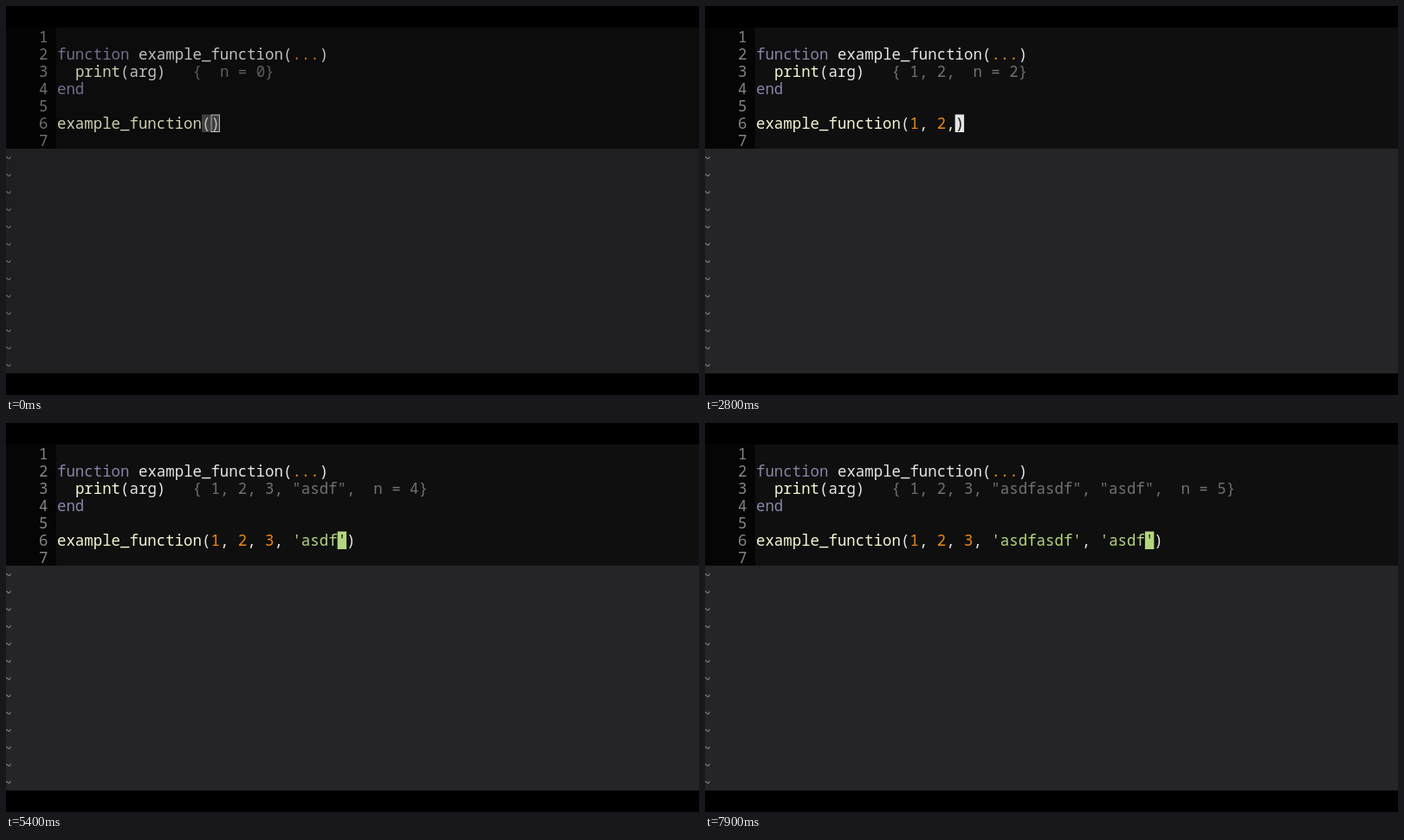
An HTML page for the animation above (8000 ms loop, 800 by 450 pixels).

```html
<!DOCTYPE html>
<html>
<head>
<meta charset="utf-8">
<style>
  html, body { margin: 0; width: 100%; height: 100%; overflow: hidden; background: #000; }
  svg { display: block; width: 800px; height: 450px; }
  text { font: 17.4px "Noto Sans Mono", "DejaVu Sans Mono", monospace; white-space: pre; }
</style>
</head>
<body>
<svg viewBox="0 0 800 450">
  <rect width="800" height="450" fill="#000"/>
  <rect y="25" width="800" height="140" fill="#0f0f10"/>
  <rect y="25" width="58" height="140" fill="#050506"/>
  <rect y="165" width="800" height="260" fill="#252427"/>
  <g id="still"></g>
  <g id="live"></g>
  <rect id="shade" width="800" height="450" fill="#000"/>
</svg>
<script>
const LOOP = 8000, CELL = 10.44, LEFT = 59, ROW = 20;
const color = {
  keyword: '#8585a6', plain: '#e6e6e6', call: '#f6f6d2', number: '#ee8a12',
  string: '#b4d67e', hint: '#717171', gutter: '#858585', tilde: '#858585',
  dark: '#161616', block: '#e4e4e2', match: '#4a4a4a'
};

const KEYS = "1, 2, 3, 'asdfasdf', 'asdf";
const TIMES = [1100, 1300, 1800, 2300, 2800, 2900, 3400, 3700, 3900, 4200,
  4800, 5000, 5100, 5300, 5600, 5700, 5900, 6000, 6400, 6900, 7000, 7200,
  7500, 7600, 7700, 7800];
const ARGS_COL = 17;

const byId = id => document.getElementById(id);
const escapeText = s => s.replace(/&/g, '&amp;').replace(/</g, '&lt;');
const colX = col => LEFT + col * CELL;

function word(row, col, content, fill) {
  return `<text x="${colX(col).toFixed(2)}" y="${22 + row * ROW}" fill="${fill}">${escapeText(content)}</text>`;
}

function cell(col, fill, stroke = 'none') {
  const inset = stroke === 'none' ? 0 : 0.5;
  return `<rect x="${colX(col) + inset}" y="${125.5 + inset}" width="${CELL - 2 * inset}" ` +
    `height="${20.5 - 2 * inset}" fill="${fill}" stroke="${stroke}"/>`;
}

function drawStill() {
  let out = '';
  for (let n = 1; n <= 7; n++) out += word(n, -2, String(n), color.gutter);
  for (let n = 8; n <= 20; n++) out += word(n, -6, '~', color.tilde);
  out += word(2, 0, 'function', color.keyword)
    + word(2, 9, 'example_function(', color.plain)
    + word(2, 26, '...', color.number)
    + word(2, 29, ')', color.plain)
    + word(3, 2, 'print', color.call)
    + word(3, 7, '(arg)', color.plain)
    + word(4, 0, 'end', color.keyword)
    + word(6, 0, 'example_function', color.call);
  byId('still').innerHTML = out;
}

function drawLive(typed, focused, matched) {
  const inString = typed.split("'").length % 2 === 0;
  const args = typed + (inString ? "'" : '');
  const cursor = ARGS_COL + typed.length;
  const values = args.match(/\d+|'[^']*'/g) || [];
  const hint = '{ ' + values.map(v => v.replace(/'/g, '"') + ', ').join('') + ` n = ${values.length}}`;

  let out = word(3, 15, hint, color.hint);
  if (matched) out += cell(ARGS_COL - 1, color.match);
  out += word(6, ARGS_COL - 1, '(', color.plain);
  for (const token of args.matchAll(/\d+|'[^']*'|,/g)) {
    const fill = token[0] === ',' ? color.plain : token[0][0] === "'" ? color.string : color.number;
    out += word(6, ARGS_COL + token.index, token[0], fill);
  }
  out += word(6, ARGS_COL + args.length, ')', color.plain);

  // The cursor covers the glyph beneath it with an inverted cell.
  const under = inString ? "'" : ')';
  out += focused
    ? cell(cursor, inString ? color.string : color.block) + word(6, cursor, under, color.dark)
    : cell(cursor, color.match, color.block) + word(6, cursor, under, color.plain);
  byId('live').innerHTML = out;
}

let lastState = '';
function render(t) {
  const count = TIMES.filter(time => time <= t).length;
  const focused = t >= 100;
  const matched = count === 0 || (t >= 6400 && t < 6600);
  const state = [count, focused, matched].join();
  if (state !== lastState) {
    drawLive(KEYS.slice(0, count), focused, matched);
    lastState = state;
  }
  byId('shade').setAttribute('opacity', 0.17 * Math.max(0, 1 - t / 800));
}

drawStill();
const start = performance.now();
function frame() {
  render((performance.now() - start) % LOOP);
  requestAnimationFrame(frame);
}
frame();
</script>
</body>
</html>
```
